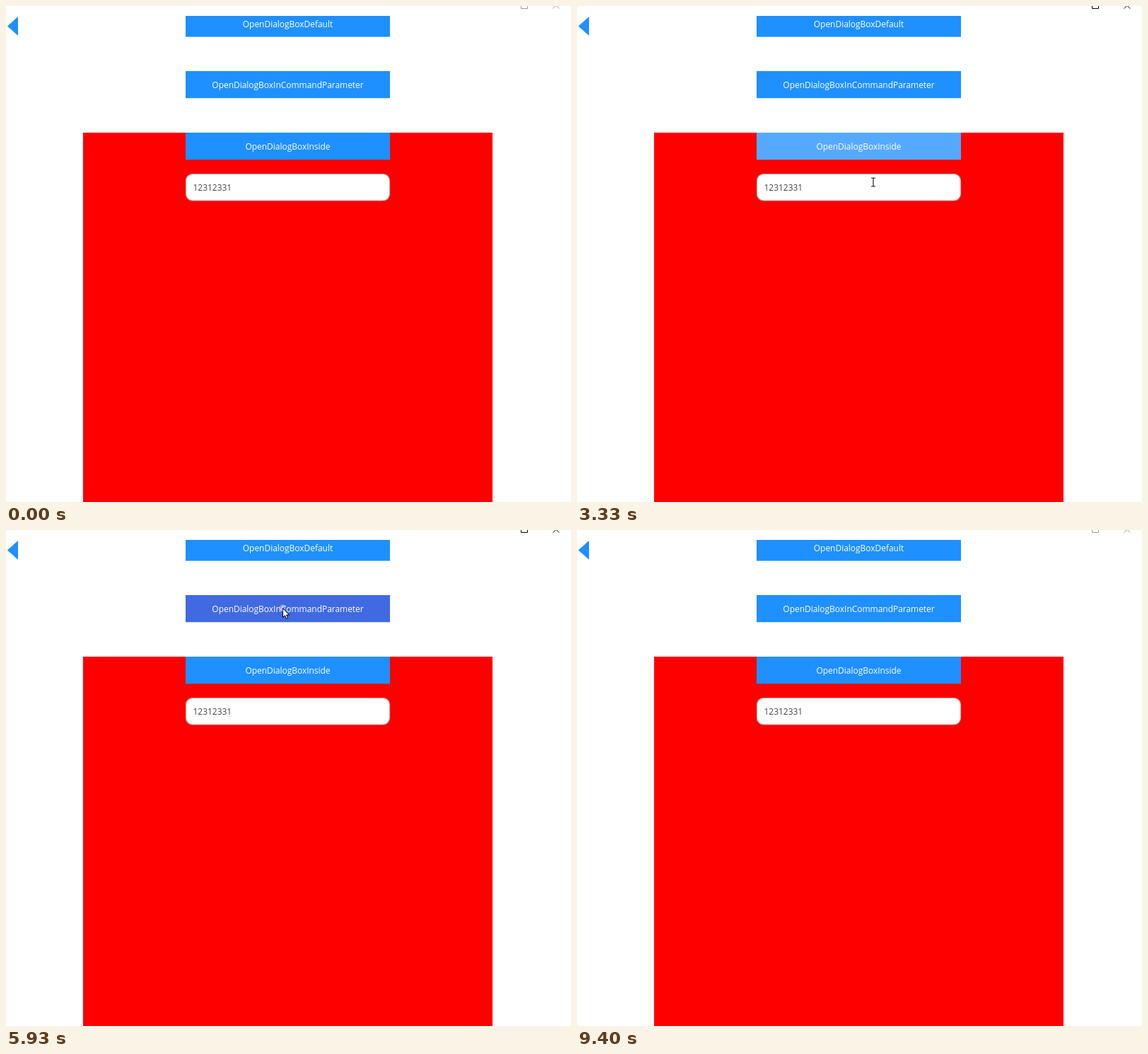
An HTML page for the animation above (9730 ms loop, 799 by 701 pixels).

```html
<!DOCTYPE html>
<html lang="en">
<head>
<meta charset="utf-8">
<title>Dialog boxes</title>
<style>
  html, body { margin: 0; width: 100%; height: 100%; overflow: hidden; background: #fff; }
  #stage { display: block; width: 799px; height: 701px; }
  text { font: 11.95px "Open Sans", "Noto Sans", sans-serif; }
  .label { fill: #fff; text-anchor: middle; }
  .value { fill: #444; }
  .veil { fill: #4e4e4e; fill-opacity: .333; }
</style>
</head>
<body>
<svg id="stage" viewBox="0 0 799 701"></svg>
<script>
const LOOP = 9733, STEP = 200 / 3;
const BLUE = [30, 144, 255], LIGHT = [85, 170, 255];

// Times in ms: hover [enter, leave], press [down, up]; ripple is local to the button.
const buttons = {
  first: { x: 254, y: 5.3, text: "OpenDialogBoxDefault",
    hover: [867, 1670], press: [1067, 1133], ripple: [155, 14.7] },
  command: { x: 254, y: 92, text: "OpenDialogBoxInCommandParameter",
    hover: [5600, 6267], press: [5867, 6000], ripple: [137, 18] },
  inside: { x: 254, y: 179, text: "OpenDialogBoxInside",
    hover: [3130, 3950], press: [3600, 3667], ripple: [176, 21] },
  changeA: { x: 96, y: 135, text: "Chance", hover: [1930, 2000] },
  closeA: { x: 96, y: 309, text: "CloseDialogBox", enabledAt: 1730,
    hover: [2467, 3100], press: [2667, 2800], ripple: [203.5, 20.5] },
  changeB: { x: 96, y: 135, text: "Chance" },
  closeB: { x: 96, y: 309, text: "CloseDialogBox",
    hover: [4467, 5100], press: [4667, 4800], ripple: [166.5, 19.5] },
  closeC: { x: 278, y: 364.5, w: 96, h: 33.5, text: "CloseDialogBox",
    hover: [6600, 7700], press: [7200, 7333], ripple: [60, 15.5] }
};

// [open, close] times
const dialogs = { dialogA: [1133, 2800], dialogB: [3733, 4800], dialogC: [6000, 7333] };

// [time, x, y]
const path = [
  [533, 815, 120], [1000, 409, 20], [1670, 409, 20], [2270, 432, 534], [2600, 385, 470],
  [2870, 385, 470], [3200, 416, 196], [3333, 419, 249], [3530, 430, 200], [3733, 430, 200],
  [4067, 487, 594], [4200, 490, 600], [4600, 420, 556], [4930, 420, 556], [5400, 395, 53],
  [5600, 391, 110], [6270, 391, 110], [6730, 338, 380], [8133, 338, 380], [8667, 493, 289],
  [8867, 493, 289], [9067, 815, 210]
];
const shapes = [[0, "arrow"], [3270, "beam"], [3400, "arrow"], [6660, "hand"], [7530, "arrow"]];

const stage = document.getElementById("stage");
const get = id => document.getElementById(id);

const button = id => {
  const { x, y, w = 289, h = 38.5, text } = buttons[id];
  return `<svg id="${id}" x="${x}" y="${y}" width="${w}" height="${h}">
    <rect width="${w}" height="${h}"/><circle fill="#fff"/>
    <text class="label" x="${w / 2}" y="${h / 2 + 5}">${text}</text></svg>`;
};
const input = (x, y, text) =>
  `<rect x="${x + .5}" y="${y + .5}" width="288" height="37.5" rx="9.5" fill="#fff" stroke="#b4b4b4" stroke-width="1.2"/>
   <text class="value" x="${x + 10.5}" y="${y + 24}">${text}</text>`;
const veil = (x, y, w, h) => `<rect class="veil" x="${x}" y="${y}" width="${w}" height="${h}"/>`;
const panel = (x, y, change, close) =>
  `<g transform="translate(${x} ${y})"><rect width="482" height="482" fill="#6b8e23"/>
   ${button(change)}${input(96, 222, "Chance")}${button(close)}</g>`;
const pageVeil = veil(0, 14, 799, 687);

stage.innerHTML = `
  <rect width="799" height="701" fill="#fff"/>
  <path d="M2.5 28.5L16.5 16V41Z" fill="#1e90ff" stroke="#1e90ff" stroke-linejoin="round"/>
  <rect x="109" y="179" width="579" height="522" fill="#f00"/>
  ${button("first")}${button("command")}${button("inside")}
  ${input(254, 237, "12312331")}
  <g id="dialogA">${pageVeil}${panel(85.5, 140.5, "changeA", "closeA")}</g>
  <g id="dialogB">${veil(109, 179, 579, 522)}${panel(157.5, 227.5, "changeB", "closeB")}</g>
  <g id="dialogC">${pageVeil}${button("closeC")}</g>
  <rect width="799" height="14" fill="#fff"/>
  <path id="caption" d="M728.5 0V3.5H737.5V0M773.5 3.8L778 -.7L782.5 3.8" fill="none"/>
  <g id="cursor" stroke-linejoin="round">
    <path id="arrow" d="M.5 .5V13.5L3.5 10.8L5.5 15.3L7.6 14.4L5.7 10H9.5Z" fill="#fff" stroke="#000"/>
    <path id="beam" d="M-3 -6H-1L0 -5L1 -6H3M0 -5V5M-3 6H-1L0 5L1 6H3" fill="none" stroke="#222" stroke-width="1.2"/>
    <path id="hand" d="M-1.2 1Q0 -1 1.2 1V6Q2.7 4.8 3.8 6.4Q5.2 5.4 6 7Q7.8 6.4 8 8.5V12.5L6.6 17.5H-.4L-4.6 11Q-4.5 8.8 -2.6 9.8L-1.2 11Z" fill="#fff" stroke="#000"/>
  </g>`;

const ramp = (t, start, length) => Math.min(1, Math.max(0, (t - start) / length));
const smooth = p => p * p * (3 - 2 * p);
const within = (t, [from, to]) => t >= from && t < to;

function paintButton(id, t) {
  const { hover = [LOOP, LOOP], press = [LOOP, LOOP], ripple = [0, 0], enabledAt = 0 } = buttons[id];
  const [face, ring] = get(id).children;
  const glow = ramp(t, hover[0], 130) - ramp(t, hover[1], 300);
  const lit = BLUE.map((c, i) => Math.round(c + (LIGHT[i] - c) * glow));
  face.setAttribute("fill", t < enabledAt ? "#d3d3d3" : within(t, press) ? "#4169e1" : `rgb(${lit})`);
  const p = ramp(t, press[0], 400);
  ring.setAttribute("cx", ripple[0]);
  ring.setAttribute("cy", ripple[1]);
  ring.setAttribute("r", 28 * p);
  ring.setAttribute("opacity", .4 * (1 - p));
}

function paintCursor(t) {
  const next = path.findIndex(k => k[0] > t);
  const b = path[next < 0 ? path.length - 1 : next];
  const a = next < 1 ? b : path[next - 1];
  const p = a === b ? 0 : smooth(ramp(t, a[0], b[0] - a[0]));
  const [x, y] = [1, 2].map(i => a[i] + (b[i] - a[i]) * p);
  get("cursor").setAttribute("transform", `translate(${x} ${y})`);
  const shape = shapes.findLast(s => s[0] <= t)[1];
  for (const id of ["arrow", "beam", "hand"])
    get(id).setAttribute("visibility", id === shape ? "visible" : "hidden");
}

function paint(t) {
  for (const id in buttons) paintButton(id, t);
  for (const id in dialogs) {
    const [open, close] = dialogs[id];
    get(id).setAttribute("opacity", ramp(t, open, 200) - ramp(t, close, 200));
  }
  get("caption").setAttribute("stroke", within(t, [1066, 9390]) ? "#000" : "#999");
  paintCursor(t);
}

const origin = performance.now();
function tick() {
  const t = Math.max(0, performance.now() - origin) % LOOP;
  paint(Math.floor((t + 4) / STEP) * STEP + .5);
  requestAnimationFrame(tick);
}
tick();
</script>
</body>
</html>
```
